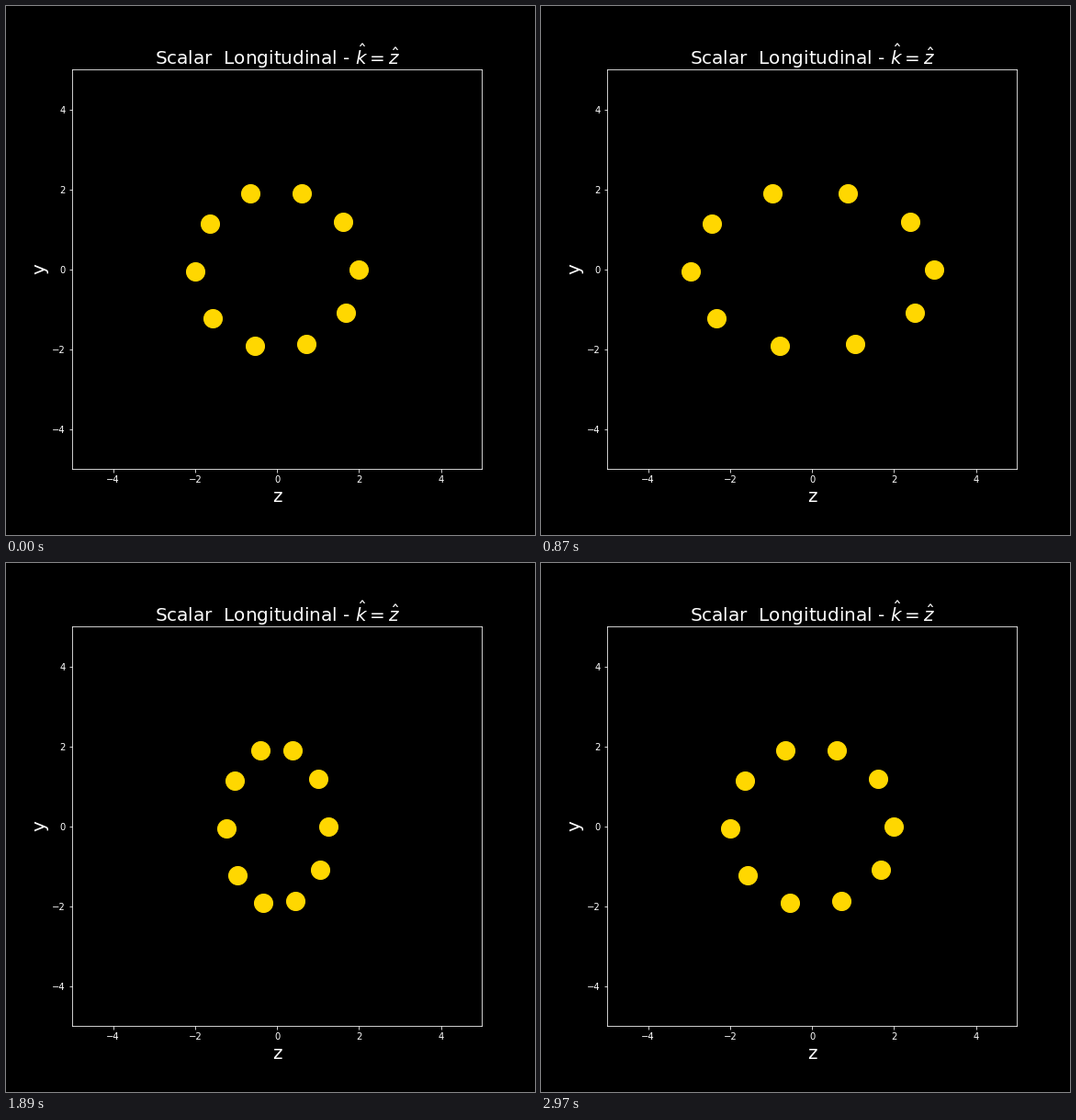
Write a matplotlib script that moves like this. It is 576 px wide and 576 px high and loops after 3000 ms.

```python
import numpy as np
import matplotlib.pyplot as plt
from matplotlib.animation import FuncAnimation

FRAMES = 100
INTERVAL = 30
RADIUS = 2
STRAIN = 0.5

plt.style.use("dark_background")
plt.rcParams["font.family"] = "DejaVu Sans"

phase = np.linspace(0, 2 * np.pi, FRAMES)
angle = phase[::10]  # the ring does not close evenly
z0, y0 = RADIUS * np.cos(angle), RADIUS * np.sin(angle)

fig, ax = plt.subplots(figsize=(8, 8), dpi=72)
fig.subplots_adjust(left=0.125, right=0.9, bottom=0.125, top=0.88)
ax.set(xlim=(-5, 5), ylim=(-5, 5))
ax.set_xticks(range(-4, 5, 2))
ax.set_yticks(range(-4, 5, 2))
ax.set_title(r"Scalar  Longitudinal - $\hat{k}=\hat{z}$", fontsize=20)
ax.set_xlabel("z", fontsize=20)
ax.set_ylabel("y", fontsize=20)

ring, = ax.plot(z0, y0, "o", color="gold", markersize=20)


def update(i):
    ring.set_data(z0 * (1 + STRAIN * np.sin(phase[i])), y0)
    return ring,


anim = FuncAnimation(fig, update, frames=FRAMES, interval=INTERVAL,
                     repeat=True, repeat_delay=0)
plt.show()
```
